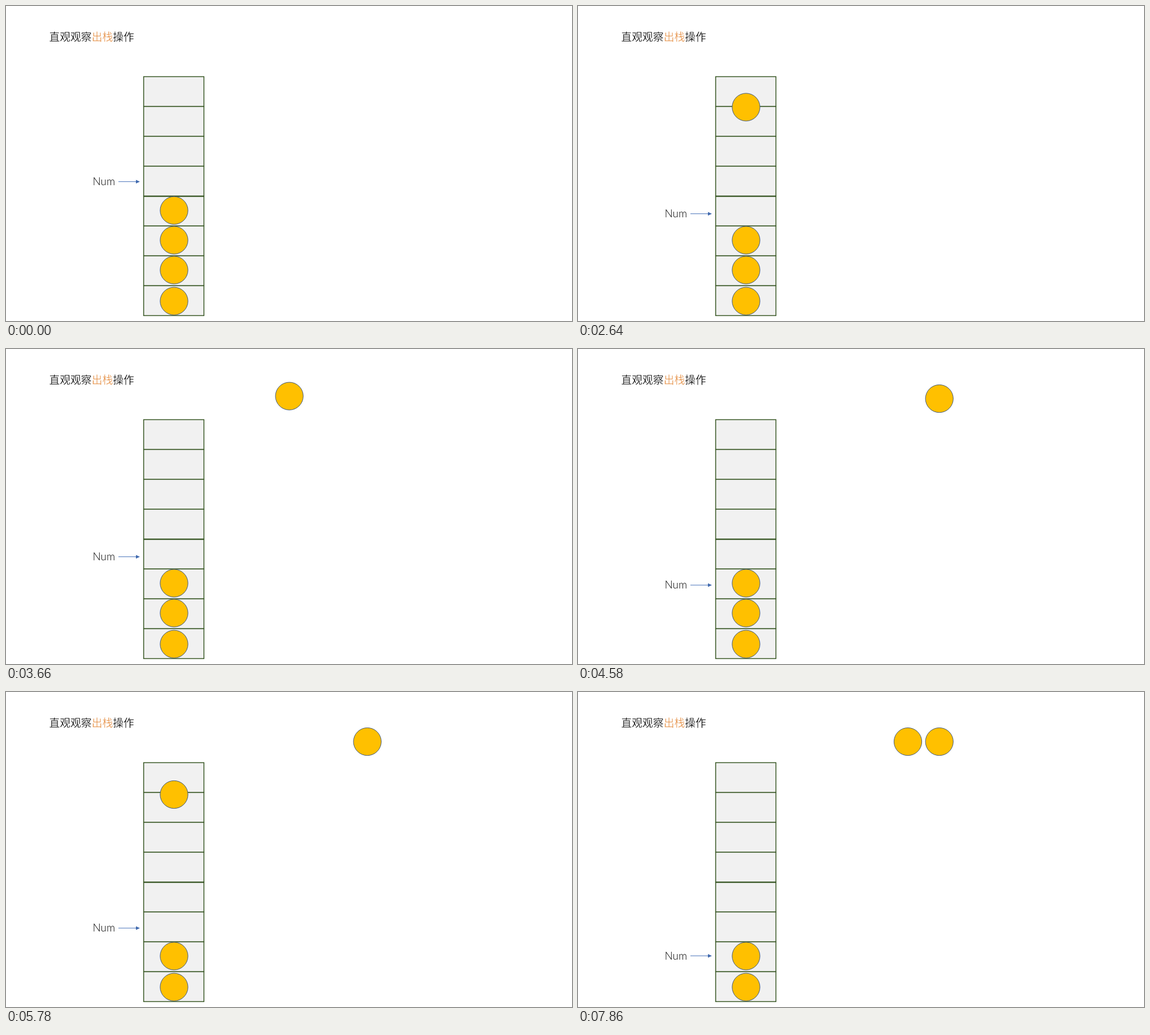
Recreate the animation shown at these times as an HTML page. Size 1002 by 559 pixels, loop 8000 ms.

```html
<!DOCTYPE html>
<html lang="zh-CN">
<head>
<meta charset="utf-8">
<style>
  html, body { margin: 0; width: 100%; height: 100%; overflow: hidden; background: #fff; }
  svg { display: block; }
  .title { font: 300 18.8px "Noto Sans CJK SC", "Noto Sans CJK", sans-serif; stroke: #fff; stroke-width: 0.3; }
  .num { font: 300 18.8px Lato, sans-serif; }
  .cell { fill: #f1f1f1; stroke: #375623; stroke-width: 1.5; }
  .ball { fill: #ffc000; stroke: #41597c; stroke-width: 1; }
</style>
</head>
<body>
<svg width="1002" height="559" viewBox="0 0 1002 559">
  <text class="title" x="76.5" y="62">直观观察<tspan fill="#e58e42">出栈</tspan>操作</text>
  <g id="cells"></g>
  <g id="balls"></g>
  <g id="pointer">
    <text class="num" x="153.6" y="6.3">Num</text>
    <path d="M199 0H231" stroke="#4470b8"/>
    <path d="M230 -3.3L237 0L230 3.3Z" fill="#416aae"/>
  </g>
</svg>
<script>
const LOOP = 8000, CX = 297.5, TOP = 88.1, CELL = 53;
const $ = id => document.getElementById(id);

function add(parent, name, attrs) {
  const el = document.createElementNS("http://www.w3.org/2000/svg", name);
  for (const key in attrs) el.setAttribute(key, attrs[key]);
  return $(parent).appendChild(el);
}

for (let i = 0; i < 8; i++)
  add("cells", "rect", { class: "cell", x: 243.7, y: 125.4 + i * CELL, width: 106.7, height: CELL });
// The stack is two groups of four, so their shared edge is thicker.
add("cells", "path", { class: "cell", d: "M243.7 337.9h106.7" });

const addBall = y => add("balls", "circle", { class: "ball", cx: CX, cy: y, r: 24.6 });
addBall(523.7);
addBall(468.6);
const second = addBall(415.6), first = addBall(362.8);

// Key points [time, x, y]; each leg is covered in equal hops.
const firstPath = [
  [2100, CX, 362.8], [2368, CX, 228], [2908, CX, 131], [3130, CX, TOP],
  [3655, 501.6, 83.6], [4050, 639.7, TOP]
];
const secondPath = [
  [4835, CX, 415.6], [5238, CX, 280], [6038, CX, 133],
  [6110, 351, TOP], [6585, 412.8, TOP], [7060, 584, TOP]
];
const pointerPath = [
  [1310, 0, 311.7], [2110, 0, 368.7], [4175, 0, 368.7],
  [4575, 0, 419], [7455, 0, 419], [7855, 0, 468.2]
];

function along(path, t, hop) {
  const i = path.findIndex(p => p[0] > t);
  if (i < 1) return path.at(i).slice(1);
  const [t0, x0, y0] = path[i - 1], [t1, x1, y1] = path[i];
  const hops = Math.max(1, Math.round(Math.hypot(x1 - x0, y1 - y0) / hop));
  const k = Math.floor((t - t0) / (t1 - t0) * hops) / hops;
  return [x0 + (x1 - x0) * k, y0 + (y1 - y0) * k];
}

function place(ball, path, t) {
  const [x, y] = along(path, t, 50);
  ball.setAttribute("cx", x);
  ball.setAttribute("cy", y);
}

function draw() {
  const t = performance.now() % LOOP;
  place(first, firstPath, t);
  place(second, secondPath, t);
  $("pointer").setAttribute("transform", `translate(${along(pointerPath, t, 16)})`);
  requestAnimationFrame(draw);
}
draw();
</script>
</body>
</html>
```
